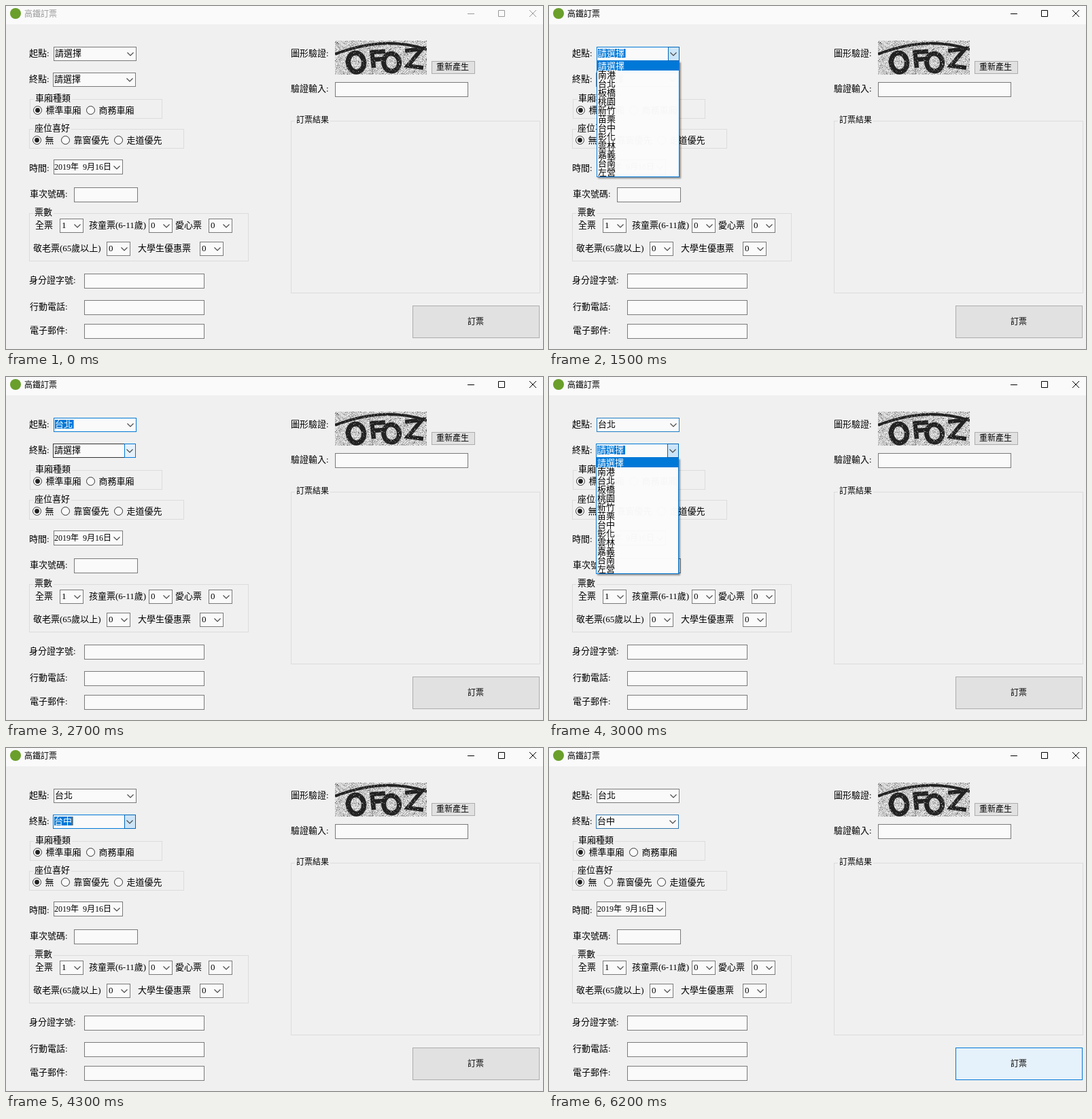
Recreate the animation shown at these times as an HTML page with a canvas. Size 790 by 505 pixels, loop 8 s.

```html
<!DOCTYPE html>
<html lang="zh-Hant">
<head>
<meta charset="utf-8">
<style>
html, body { margin: 0; width: 100%; height: 100%; overflow: hidden; background: #f0f0f0; }
svg, canvas { position: absolute; left: 0; top: 0; display: block; }
canvas { left: 484px; top: 51px; }
text { font: 500 13px 'Liberation Serif', 'Noto Sans CJK TC', 'Noto Sans CJK', serif; white-space: pre; }
.small { font-size: 12px; }
.list { filter: drop-shadow(2.5px 2.5px 1px rgba(0, 0, 0, .42)); }
</style>
</head>
<body>
<svg id="stage" width="790" height="505" viewBox="0 0 790 505"></svg>
<canvas id="captcha" width="135" height="50"></canvas>
<script>
const LOOP = 8000;
const BLUE = '#0078d7', DEEP = '#005499', HOT = '#e5f1fb', PRESSED = '#cce4f7';
const FIELD = '#fafafa', EDGE = '#7a7a7a', FACE = '#f0f0f0';
const stage = document.getElementById('stage');

function set(node, attrs) {
  for (const key in attrs) node.setAttribute(key, attrs[key]);
  return node;
}
function add(tag, attrs, parent = stage) {
  return parent.appendChild(set(document.createElementNS('http://www.w3.org/2000/svg', tag), attrs));
}
function label(x, y, content, cls = '', parent = stage) {
  const node = add('text', { x, y, class: cls }, parent);
  node.textContent = content;
  return node;
}
const fillBox = (x, y, width, height, fill, parent) => add('rect', { x, y, width, height, fill }, parent);
// One-pixel outline covering w by h pixels.
const box = (x, y, w, h, fill = FIELD, stroke = EDGE, parent) =>
  add('rect', { x: x + .5, y: y + .5, width: w - 1, height: h - 1, fill, stroke }, parent);
const chevron = (x, y) =>
  add('path', { d: `M${x - 4.5} ${y - 2}l4.5 4.5 4.5-4.5`, fill: 'none', stroke: '#444', 'stroke-width': 1.1 });

function group(x, y, w, h, title, cls) {
  box(x, y, w, h, 'none', '#dcdcdc');
  const size = cls ? 12 : 13;
  fillBox(x + 6, y, title.length * size + 4, 1, FACE);
  label(x + 8, y + 3, title, cls);
}
function radio(x, y, title, on) {
  add('circle', { cx: x, cy: y, r: 6, fill: FIELD, stroke: '#333' });
  if (on) add('circle', { cx: x, cy: y, r: 3.4, fill: '#222' });
  label(x + 12, y + 4.5, title);
}
function counter(x, y, value) {
  box(x, y, 35, 21);
  label(x + 3, y + 14, value);
  chevron(x + 26, y + 10.5);
}

// Title bar
fillBox(0, 0, 790, 505, FACE);
fillBox(0, 0, 790, 27, FIELD);
add('circle', { cx: 14, cy: 11, r: 8, fill: '#6a9f2b' });
const caption = label(27, 16, '高鐵訂票', 'small');
const controls = add('path', {
  d: 'M679 11.5h10M724.5 6.5h9v9h-9zM770 6l10 10M780 6l-10 10', fill: 'none'
});

// Form
[[34, 74, '起點:'], [34, 112, '終點:'], [34, 243, '時間:'], [35, 281, '車次號碼:'],
 [34, 408, '身分證字號:'], [35, 447, '行動電話:'], [35, 482, '電子郵件:'],
 [419, 74, '圖形驗證:'], [419, 126, '驗證輸入:']].forEach(row => label(...row));
group(35, 137, 195, 29, '車廂種類');
radio(46.5, 153.5, '標準車廂', true);
radio(124.5, 153.5, '商務車廂');
group(34, 181, 228, 29, '座位喜好');
radio(45.5, 197.5, '無', true);
radio(87.5, 197.5, '靠窗優先');
radio(165.5, 197.5, '走道優先');
group(34, 305, 323, 71, '票數');
group(419, 169, 367, 254, '訂票結果', 'small');
box(70, 226, 102, 22);
label(71, 241, '2019年  9月16日', 'small');
chevron(163, 237.5);
box(100, 267, 94, 22);
[394, 433, 468].forEach(y => box(115, y, 177, 22));
box(484, 112, 196, 22);
[[43, 327, '全票'], [122, 327, '孩童票(6-11歲)'], [249, 327, '愛心票'],
 [40, 361, '敬老票(65歲以上)'], [194, 361, '大學生優惠票']].forEach(row => label(...row));
[[79, 313, '1'], [210, 313, '0'], [298, 313, '0'], [148, 347, '0'], [285, 347, '0']]
  .forEach(row => counter(...row));
box(626, 81, 64, 19, '#e1e1e1', '#adadad');
label(633, 94, '重新產生', 'small');
const submit = box(598, 441, 187, 48);
label(679, 469, '訂票', 'small');

// Station pickers
const stations = ['請選擇', '南港', '台北', '板橋', '桃園', '新竹', '苗栗', '台中', '彰化', '雲林', '嘉義', '台南', '左營'];

function picker(x, y) {
  const frame = box(x, y, 122, 21);
  const button = box(x + 105, y, 17, 21);
  chevron(x + 113, y + 10.5);
  const mark = fillBox(x + 2, y + 3, 0, 13, BLUE);
  const value = label(x + 2, y + 14, '');
  const caret = fillBox(0, y + 3, 1, 13, '#ff8728');
  return { x, y, frame, button, mark, value, caret };
}
function addList(p) {
  const { x, y } = p;
  p.list = add('g', { class: 'list' });
  const back = box(x, y + 21, 122, 171, '#fff', BLUE, p.list);
  set(back, { 'fill-opacity': .965 });
  p.bar = fillBox(x + 1, y + 22, 120, 13, BLUE, p.list);
  p.items = stations.map((name, i) => label(x + 2, y + 33 + 13 * i, name, '', p.list));
}
function drawPicker(p, s) {
  const width = stations[s.pick].length * 13 + 2;
  set(p.frame, { stroke: s.edge });
  set(p.button, { fill: s.face, stroke: s.rim });
  set(p.mark, { width: s.marked ? width : 0 });
  p.value.textContent = stations[s.pick];
  set(p.value, { fill: s.marked ? '#fff' : '#000' });
  set(p.caret, { x: p.x + 1 + width, opacity: s.caret });
  set(p.list, { opacity: s.open });
  set(p.bar, { y: p.y + 22 + 13 * s.row });
  p.items.forEach((item, i) => set(item, { fill: i === s.row ? '#fff' : '#000' }));
}
const from = picker(70, 60), to = picker(69, 98);
[from, to].forEach(addList);

// Captcha: speckled paper, a sweeping arc and four bent letters.
function drawCaptcha() {
  const ctx = document.getElementById('captcha').getContext('2d');
  let seed = 7;
  const random = () => (seed = seed * 16807 % 2147483647) / 2147483647;
  const speckle = (chance, low, span) => {
    for (let i = 0; i < 135 * 50; i++) {
      if (random() > chance) continue;
      const v = low + random() * span | 0;
      ctx.fillStyle = `rgb(${v},${v},${v})`;
      ctx.fillRect(i % 135, i / 135 | 0, 1, 1);
    }
  };
  speckle(1, 165, 85);
  ctx.strokeStyle = '#222';
  const stroke = (width, d) => { ctx.lineWidth = width; ctx.stroke(new Path2D(d)); };
  stroke(4, 'M0 20Q72-8 135 13');
  stroke(6.5, 'M54 14L57 40M52 17L74 16M55 28L70 27');
  stroke(6, 'M103 15L128 12L107 37L130 40');
  [[31, 32, 11.5, 14, 7.5], [83, 32, 11.5, 13, 7]].forEach(([x, y, rx, ry, width]) => {
    ctx.lineWidth = width;
    ctx.beginPath();
    ctx.ellipse(x, y, rx, ry, -.15, 0, 7);
    ctx.stroke();
  });
  speckle(.09, 70, 110);
}
drawCaptcha();

// Each step changes some properties of one part from its time on.
const idle = { edge: EDGE, face: 'none', rim: 'none', pick: 0, marked: 0, caret: 0, open: 0, row: 0 };
const steps = [
  [1000, 'from', { edge: '#555', face: '#f4f8fb', rim: '#3f97d8' }],
  [1100, 'from', { edge: '#333', face: HOT, rim: BLUE }],
  [1300, 'window', { ink: '#000' }],
  [1300, 'from', { edge: BLUE, face: PRESSED, rim: '#0067b8', marked: 1, caret: 1, open: .4 }],
  [1400, 'from', { open: .75 }],
  [1500, 'from', { open: 1 }],
  [1700, 'from', { row: 1 }],
  [1900, 'from', { row: 2 }],
  [2000, 'from', { caret: 0 }],
  [2300, 'from', { open: 0, pick: 2, caret: 1 }],
  [2400, 'from', { face: HOT, rim: '#6fb2e6' }],
  [2500, 'from', { face: 'none', rim: 'none' }],
  [2700, 'to', { edge: '#333', face: HOT, rim: BLUE }],
  [2800, 'from', { marked: 0, caret: 0 }],
  [2800, 'to', { edge: BLUE, face: PRESSED, rim: '#0067b8', marked: 1, caret: 1, open: .4 }],
  [2900, 'to', { open: .75 }],
  [3000, 'to', { open: 1, caret: 0 }],
  [3000, 'from', { edge: '#1f7dc4' }],
  [3100, 'from', { edge: '#3f7cab' }],
  [3200, 'from', { edge: '#5f7b92' }],
  [3300, 'from', { edge: EDGE }],
  ...[1, 2, 3, 5, 6, 7].map((row, i) => [3500 + 100 * i, 'to', { row }]),
  [4300, 'to', { open: 0, pick: 7, caret: 1 }],
  [4400, 'to', { face: '#dbecf9', rim: '#4a9fdf' }],
  [4500, 'to', { face: '#eff6fb', rim: '#a5cfee' }],
  [4600, 'to', { face: 'none', rim: 'none' }],
  [4800, 'to', { caret: 0 }],
  [5300, 'to', { caret: 1 }],
  [5600, 'submit', { fill: HOT, stroke: BLUE }],
  [5800, 'to', { caret: 0 }],
  [6000, 'to', { marked: 0 }],
  [6000, 'submit', { fill: PRESSED, stroke: DEEP }],
  [6100, 'to', { edge: '#1a76c0' }],
  [6200, 'to', { edge: '#3277ae' }],
  [6200, 'submit', { fill: HOT, stroke: BLUE }]
];

function render(time) {
  const state = {
    window: { ink: '#999' },
    from: { ...idle },
    to: { ...idle },
    submit: { fill: '#e1e1e1', stroke: '#adadad' }
  };
  for (const [start, part, change] of steps) {
    if (start <= time) Object.assign(state[part], change);
  }
  set(caption, { fill: state.window.ink });
  set(controls, { stroke: state.window.ink });
  set(submit, state.submit);
  drawPicker(from, state.from);
  drawPicker(to, state.to);
}

const begin = performance.now();
function tick() {
  render((performance.now() - begin) % LOOP);
  requestAnimationFrame(tick);
}
tick();
</script>
</body>
</html>
```
